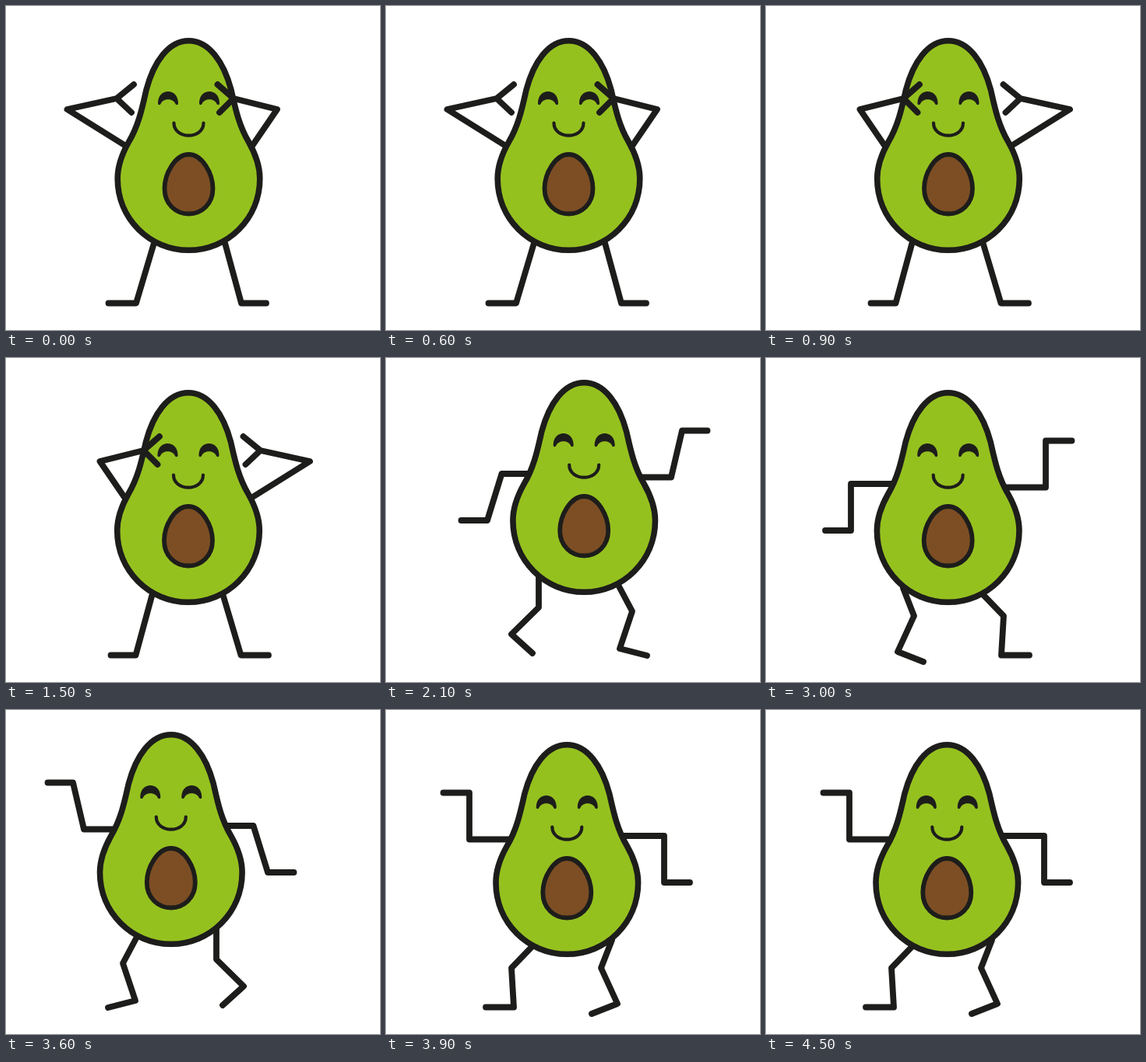
An HTML page for the animation above (4.8 s loop, 480 by 417 pixels).

```html
<!DOCTYPE html>
<html lang="en">
<head>
<meta charset="utf-8">
<title>Dancing avocado</title>
<style>
  html, body { margin: 0; width: 100%; height: 100%; overflow: hidden; background: #fff; }
  svg { display: block; width: 100vw; height: 100vh; }
  .limbs { fill: none; stroke: #1d1d1b; stroke-width: 7.8; stroke-linecap: round; stroke-linejoin: round; }

  /* Sixteen beats of 300 ms; each pose shows on alternate beats of its phrase. */
  .pose { visibility: hidden; animation: 4.8s step-end var(--shift, 0s) infinite; }
  .three { animation-name: three; }
  .two { animation-name: two; }
  @keyframes three {
    0%, 12.5%, 25% { visibility: visible; }
    6.25%, 18.75%, 31.25%, 100% { visibility: hidden; }
  }
  @keyframes two {
    0%, 12.5% { visibility: visible; }
    6.25%, 18.75%, 100% { visibility: hidden; }
  }
</style>
</head>
<body>
<svg viewBox="0 0 480 417">
  <defs>
    <path id="eye" fill="#1d1d1b" d="M-13 125C-13 105 13 105 13 125C13 128 10 128 9 125C6 118.500-6 118.500-9 125C-10 128-13 128-13 125Z"/>
    <g id="body" stroke="#1d1d1b">
      <path fill="#95c11f" stroke-width="7.600" d="M0 44.700C26 44.700 45 72 54.500 108C59.500 130 64 153 77 175C86 191 91.300 205 91.300 222C91.300 274 50 314.300 0 314.300C-50 314.300-91.300 274-91.300 222C-91.300 205-86 191-77 175C-64 153-59.500 130-54.500 108C-45 72-26 44.700 0 44.700Z"/>
      <path fill="#7d4e24" stroke-width="5.800" d="M0 191C17.500 191 31 216 31 235C31 255 16.500 267.500 0 267.500C-16.500 267.500-31 255-31 235C-31 216-17.500 191 0 191Z"/>
      <path fill="none" stroke-width="4.200" stroke-linecap="round" d="M-19 150.500C-19 172 19 172 19 150.500"/>
      <use href="#eye" x="-26.500" stroke="none"/>
      <use href="#eye" x="26.500" stroke="none"/>
    </g>

    <g id="wave">
      <path class="limbs" d="M190 305L167 382.500H131.500M281 305L302 382.500H334"/>
      <use href="#body" x="234.500"/>
      <path class="limbs" d="M152 179L78.500 133L142 119M164 101L142 119L161 137M316 180L348 133L292 119M271.500 101L292 119L274 137"/>
    </g>
    <g id="hop">
      <path class="limbs" d="M182 149H148.500L130 209H96.500M328 153.500H366L380 93.500H412.500M196 280V321L161 355.500L188 380M298 292L316 326L300 374L335 383"/>
      <use href="#body" x="254.200" y="-13"/>
    </g>
    <g id="dip">
      <path class="limbs" d="M160 166.500H107V106.500H73.500M303 162H357V222H390M187 305L161 332L164 382.500H128M290 296L276 332L297 378L264 391"/>
      <use href="#body" x="232.300"/>
    </g>
  </defs>

  <g class="pose three"><use href="#wave"/></g>
  <g class="pose three" style="--shift: -4.5s"><use href="#wave" transform="matrix(-1 0 0 1 468.500 0)"/></g>
  <g class="pose three" style="--shift: -3s"><use href="#dip" transform="matrix(-1 0 0 1 466 0)"/></g>
  <g class="pose two" style="--shift: -2.7s"><use href="#hop"/></g>
  <g class="pose three" style="--shift: -1.5s"><use href="#dip"/></g>
  <g class="pose two" style="--shift: -1.2s"><use href="#hop" transform="matrix(-1 0 0 1 466 0)"/></g>
</svg>
</body>
</html>
```
